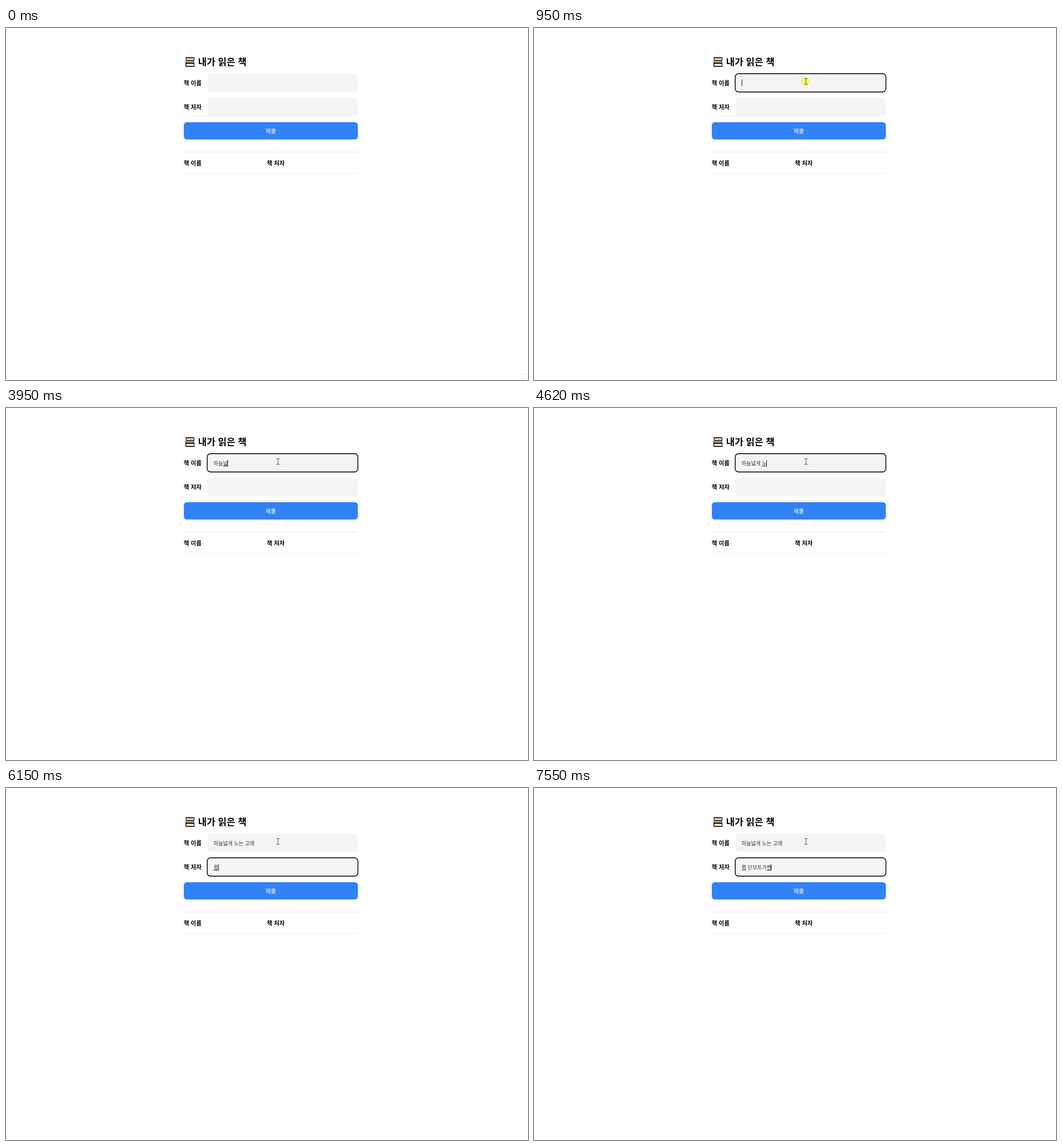
Write an HTML page that moves like this. It is 910 by 615 pixels and loops after 8 s.

```html
<!DOCTYPE html>
<html lang="ko">
<head>
<meta charset="utf-8">
<title>내가 읽은 책</title>
<style>
  html, body { margin: 0; width: 100%; height: 100%; overflow: hidden; background: #fff; }
  svg { display: block; width: 910px; height: 615px; }
  text { font-family: "Noto Sans CJK KR", "Noto Sans CJK", "Noto Sans", sans-serif; white-space: pre; }
  .title { font-size: 16.4px; font-weight: 700; }
  .label { font-size: 10.2px; font-weight: 700; }
  .submit { font-size: 10.2px; font-weight: 500; fill: #fff; text-anchor: middle; }
  .value { font-size: 9px; fill: #333; }
  .field { fill: #f2f4f6; }
  .ring { fill: none; stroke: #000; stroke-width: 1.4; }
  .books { stroke: #151515; stroke-width: 1.1; stroke-linejoin: round; }
</style>
</head>
<body>
<svg viewBox="0 0 910 615">
  <g class="books">
    <path d="M315 52h13v4.2h-13q-2.4-2.1 0-4.2z" fill="#f6ead9"/>
    <path d="M314.5 57h12.5v4.2h-12.5q-2.4-2.1 0-4.2z" fill="#e9a15c"/>
    <path d="M314 62h14v4.8h-14q-2.8-2.4 0-4.8z" fill="#fff"/>
    <path d="M313 52h15M312.5 61.6h16M313 67h15.5" fill="none" stroke-width="1.6"/>
    <path d="M313.8 57.8v3" stroke="#2f8fd8" stroke-width="2.4"/>
    <path d="M313.9 63v2.8" stroke="#d9782d" stroke-width="2.6"/>
  </g>
  <text class="title" x="334.8" y="64.8">내가 읽은 책</text>

  <text class="label" x="309.8" y="100.2">책 이름</text>
  <rect class="field" x="351" y="80" width="262.5" height="31.4" rx="5.5"/>
  <text class="label" x="309.8" y="142.4">책 저자</text>
  <rect class="field" x="351" y="122.3" width="262.5" height="31.4" rx="5.5"/>

  <rect x="310" y="164.6" width="303.5" height="30.2" rx="5.5" fill="#3182f6"/>
  <text class="submit" x="461.6" y="184.2">제출</text>

  <path d="M310 216.7H613.5" stroke="#e5e8eb" stroke-width="1.4" stroke-dasharray="4 2.5"/>
  <text class="label" x="309.8" y="239.8">책 이름</text>
  <text class="label" x="454.8" y="239.8">책 저자</text>
  <path d="M309 253.8H613.5" stroke="#f0f2f4" stroke-width="1.3"/>

  <text class="value" id="name" x="361.8" y="99.8"></text>
  <text class="value" id="author" x="361.8" y="142"></text>
  <path id="spell" d="M362 143.4l1.4 1 1.4-1 1.4 1 1.4-1 1.4 1 1.2-1" fill="none" stroke="#555" stroke-width=".8"/>

  <g id="focus">
    <rect class="ring" x="350.7" y="79.7" width="262.8" height="32" rx="5.8"/>
    <rect id="under" y="101" height="1" fill="#444"/>
    <rect id="caret" width="1" height="11" fill="#222"/>
  </g>

  <circle id="click" cx="472.8" cy="93" r="8" fill="#faf546" fill-opacity=".72"/>
  <path id="beam" d="M471 88.5h2.3l.7.6.7-.6h2.3M471 98.5h2.3l.7-.6.7.6h2.3M474 89v9" fill="none" stroke="#444" stroke-width=".9"/>
  <path id="arrow" d="M0 0v11l2.6-2.4 1.7 3.9 1.7-.8-1.7-3.7h3.5z" fill="#fff" stroke="#222" stroke-width=".7"/>
  <g id="corner">
    <path d="M910 604.5H901.5V615" fill="none" stroke="#e6e6e6"/>
    <path d="M907 612.5h3" stroke="#d8d8d8"/>
  </g>
</svg>
<script>
  const LOOP = 8000, LEFT = 362, SYLLABLE = 8.28, SPACE = 2.02, ROW = 42.3;
  const el = id => document.getElementById(id);
  const [nameText, authorText, spell, focus, under, caret, click, beam, arrow, corner] =
    ["name", "author", "spell", "focus", "under", "caret", "click", "beam", "arrow", "corner"].map(el);

  // Spreads the composing states of one burst evenly from start to end.
  const burst = (start, end, prefix, states) => states.split("|").map((s, i, all) =>
    [start + (all.length > 1 ? (end - start) * i / (all.length - 1) : 0), prefix + s]);

  const nameKeys = [
    ...burst(2190, 2330, "", "ㅎ|하"),
    ...burst(3000, 3150, "", "한|하느|하늘"),
    ...burst(3610, 3810, "하늘", "ㄴ|너|널"),
    ...burst(3950, 3950, "하늘", "넓"),
    ...burst(4150, 4280, "하늘넓", "ㄱ|게|게 "),
    ...burst(4480, 4480, "하늘넓게 ", "ㄴ"),
    ...burst(4620, 5010, "하늘넓게 ", "노|논|노느|노는|노는 ㄱ|노는 고"),
    ...burst(5150, 5220, "하늘넓게 노는 ", "골|고래")
  ];
  const authorKeys = [
    ...burst(5880, 6150, "", "ㅋ|쿠|퀴|퀼"),
    ...burst(6220, 6290, "퀼 ", "|ㄷ"),
    ...burst(6430, 6960, "퀼 ", "다|단|단ㅁ|단모|단몥|단모트"),
    ...burst(7160, 7550, "퀼 단모", "특|트가|트갑|트가베|트가벤")
  ];
  const path = [[854, 322], [792, 196], [712, 84], [630, 26], [560, 15], [505, 48]];

  const typed = (keys, t) => keys.reduce((text, [at, s]) => t >= at ? s : text, "");
  const width = s => [...s].reduce((w, c) => w + (c === " " ? SPACE : SYLLABLE), 0);
  const show = (node, on) => node.setAttribute("visibility", on ? "visible" : "hidden");
  const within = (t, a, b) => t >= a && t < b;

  function draw(t) {
    const name = typed(nameKeys, t), author = typed(authorKeys, t);
    nameText.textContent = name;
    authorText.textContent = author;
    show(spell, t >= 6220);

    const second = t >= 5420, text = second ? author : name;
    const end = LEFT + width(text), focused = t >= 950;
    const composing = text !== "" && !text.endsWith(" ");
    focus.setAttribute("transform", `translate(0 ${second ? ROW : 0})`);
    show(focus, focused);
    caret.setAttribute("x", Math.floor(end));
    caret.setAttribute("y", text ? 91 : 90);
    show(caret, focused && !within(t, 1470, 2000) && !within(t, 2860, 3000));
    under.setAttribute("x", end - SYLLABLE);
    under.setAttribute("width", SYLLABLE);
    show(under, focused && composing);

    const step = Math.floor((t - 330) / (410 / 6));
    const moving = t >= 330 && step < path.length;
    show(arrow, moving);
    if (moving) arrow.setAttribute("transform", `translate(${path[step]})`);
    show(beam, step >= path.length);
    show(click, within(t, 950, 1010));
    show(corner, t < 70);
  }

  const begin = performance.now();
  function tick() {
    draw((performance.now() - begin) % LOOP);
    requestAnimationFrame(tick);
  }
  tick();
</script>
</body>
</html>
```
